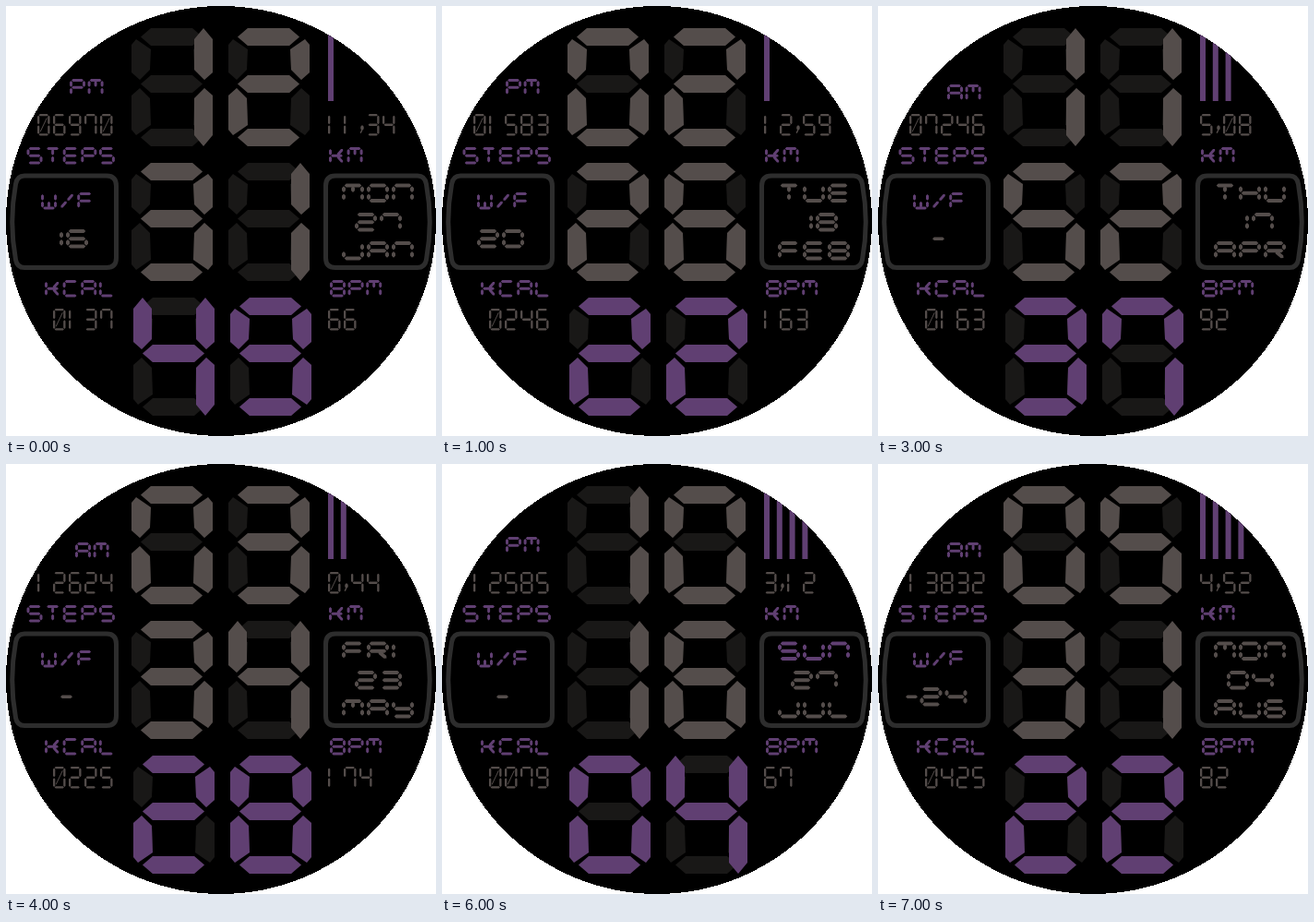
Animation, 466 px wide and 466 px high, one loop 8 s. Source, as an HTML page:

```html
<!DOCTYPE html>
<html lang="en">
<head>
<meta charset="utf-8">
<title>Digital watch face</title>
<style>
html, body { margin: 0; width: 100%; height: 100%; overflow: hidden; background: #fff; }
svg { display: block; width: 466px; height: 466px; }
</style>
</head>
<body>
<svg viewBox="0 0 466 466" role="img" aria-label="Watch face">
  <clipPath id="dial"><circle cx="233" cy="233" r="233"/></clipPath>
  <circle cx="233" cy="233" r="233" shape-rendering="crispEdges"/>
  <g clip-path="url(#dial)">
    <g fill="none" stroke="#2d2d2d" stroke-width="5">
      <path id="box" d="M20 184H109Q119.5 184 119.5 195V273Q119.5 283.500 109 283.500H20Q12 283.500 10.500 275Q3 234 10.500 193Q12 184 20 184Z"/>
      <use href="#box" transform="translate(466 0) scale(-1 1)"/>
    </g>
    <path id="dim" fill="#191817"/>
    <path id="grey" fill="#544d4b"/>
    <path id="purple" fill="#603f72"/>
  </g>
</svg>
<script>
// Lit segments: a-g as on a seven-segment display,
// i/l upper and lower centre, j/k/m diagonals, z a thin slash.
const GLYPHS = {
  0: 'abcdef', 1: 'bc', 2: 'abged', 3: 'abgcd', 4: 'fbgc', 5: 'afgcd',
  6: 'afgecd', 7: 'fabc', 8: 'abcdefg', 9: 'abcdfg',
  A: 'abcefg', B: 'abcdefg', C: 'adef', D: 'abcdef', E: 'adefg', F: 'aefg',
  G: 'acdefg', H: 'bcefg', I: 'ef', J: 'bcde', K: 'efgjk', L: 'def', M: 'abcefi',
  N: 'abcef', O: 'abcdef', P: 'abefg', R: 'abefgk', S: 'acdfg', T: 'ail',
  U: 'bcdef', W: 'bcdefl', Y: 'bcdfg', '/': 'jm'
};
const THIN = { ...GLYPHS, 0: 'abcdefz', 1: 'ef' };

const WIDE = { w: 24, h: 20.5, t: 4, gap: .7, step: 27, map: GLYPHS };
const LABEL = { w: 17, h: 18.5, t: 3, gap: .6, step: 19.6, map: GLYPHS };
const SLIM = { w: 13.5, h: 23.5, t: 2.3, gap: .5, step: 17, map: THIN };

const poly = pts => 'M' + pts.map(p => p.map(v => v.toFixed(1)).join(' ')).join('L') + 'Z';

// Hexagonal bar between two points
function bar(x1, y1, x2, y2, t, gap = 0, tip = t / 2) {
  const len = Math.hypot(x2 - x1, y2 - y1);
  const u = (x2 - x1) / len, v = (y2 - y1) / len, r = t / 2;
  const at = (s, n) => [x1 + u * s - v * n, y1 + v * s + u * n];
  const s = gap, e = len - gap;
  return poly([at(s, 0), at(s + tip, r), at(e - tip, r), at(e, 0), at(e - tip, -r), at(s + tip, -r)]);
}

function glyph(segs, x, y, { w, h, t, gap }) {
  const L = x + t / 2, R = x + w - t / 2, C = x + w / 2;
  const T = y + t / 2, B = y + h - t / 2, M = y + h / 2;
  const ends = {
    a: [L, T, R, T], b: [R, T, R, M], c: [R, M, R, B], d: [L, B, R, B],
    e: [L, M, L, B], f: [L, T, L, M], g: [L, M, R, M],
    i: [C, T, C, M], l: [C, M, C, B],
    j: [C, M, R, T], k: [C, M, R, B], m: [C, M, L, B]
  };
  return [...segs].map(s => s === 'z'
    ? bar(L + 2, B - 3, R - 2, T + 3, 1)
    : bar(...ends[s], t, gap)).join('');
}

function text(str, x, y, font) {
  let d = '';
  for (const ch of str) {
    if (ch === ',') {
      d += bar(x + 3, y + 12, x + 3, y + 18, 3.4) + bar(x + 3, y + 17, x + 1, y + 21, 1.4);
      x += 8;
    } else if (ch === '-') {
      d += bar(x, y + font.h / 2, x + 13, y + font.h / 2, 3.6);
      x += 15.5;
    } else {
      d += glyph(font.map[ch], x, y, font);
      x += font.step;
    }
  }
  return d;
}

// Large digit, 88 x 128: one upright mirrored into four, three flat bars.
// An upright reaches to a point where the bar at its end is off.
function bigDigit(lit, x, y) {
  const flat = cy => bar(x + 10, y + cy, x + 77, y + cy, 19, 0, 11);
  const upright = (right, low) => {
    const mid = low ? 63 : 56;
    const end = lit.includes(low ? 'd' : 'a')
      ? [[0, 18], [5, 12], [21, 23]]
      : [[0, 12], [10, 0], [20, 12]];
    return poly([...end, [20, mid - 11], [9, mid], [0, mid - 8]].map(([a, b]) =>
      [x + (right ? 88 - a : a), y + (low ? 128 - b : b)]));
  };
  const draw = {
    a: () => flat(9.5), g: () => flat(60.5), d: () => flat(118.5),
    f: () => upright(false, false), b: () => upright(true, false),
    e: () => upright(false, true), c: () => upright(true, true)
  };
  return [...lit].map(s => draw[s]()).join('');
}

// Six digits in three rows of two
const bigDigits = digits => [...digits].map((ch, n) => {
  const row = n >> 1, shift = row === 2 ? 2 : 0;
  return bigDigit(GLYPHS[ch], 136 + 105 * (n % 2) + shift, 24 + 146 * row);
});

const LABELS = text('STEPS', 22.5, 153, LABEL) + text('KM', 350, 153, LABEL) +
  text('W/F', 38, 202, LABEL) + text('KCAL', 42, 297, LABEL) + text('BPM', 351, 297, LABEL);

// One reading a month: time, half, steps, km, w/f, kcal, bpm, day, bars
const READINGS = `
  123149 PM 06970 11,34 16 0137 66 27 1
  022622 PM 01583 12,59 20 0246 163 18 1
  073414 AM 01899 0,93 - 0384 166 05 6
  115237 AM 07246 5,08 - 0163 92 17 3
  033428 AM 12624 0,44 - 0225 174 23 2
  045154 PM 08317 2,75 - 0318 85 14 5
  101604 PM 12585 3,12 - 0079 67 27 4
  053122 AM 13832 4,52 -24 0425 82 04 4`.trim().split('\n');

const MONTHS = ['JAN', 'FEB', 'MAR', 'APR', 'MAY', 'JUN', 'JUL', 'AUG'];
const DAYS = ['SUN', 'MON', 'TUE', 'WED', 'THU', 'FRI', 'SAT'];

function build(line, month) {
  const [time, half, steps, km, wf, kcal, bpm, day, bars] = line.trim().split(' ');
  const weekday = new Date(2025, month, +day).getDay();
  const big = bigDigits(time);
  const name = text(DAYS[weekday], 364, 192.5, WIDE);
  const wfX = wf === '-' ? 59 : wf[0] === '-' ? 30 : 38;

  let grey = big.slice(0, 4).join('') +
    text(steps, 34, 117, SLIM) + text(km, 349, 117, SLIM) +
    text(kcal, 51, 328, SLIM) + text(bpm, 349, 328, SLIM) +
    text(wf, wfX, 242, WIDE) + text(day, 378, 224, WIDE) +
    text(MONTHS[month], 364, 255, WIDE);
  let purple = big.slice(4).join('') + LABELS +
    (half === 'PM' ? text(half, 69, 79, LABEL) : text(half, 75, 85, LABEL));
  for (let n = 0; n < bars; n++) purple += `M${349 + n * 13.8} 20h6v83h-6Z`;

  if (weekday === 0) purple += name;
  else grey += name;
  return { grey, purple };
}

const scenes = READINGS.map(build);
const setPath = (id, d) => document.getElementById(id).setAttribute('d', d);
setPath('dim', bigDigits('888888').join(''));

let shown = -1;
function draw(ms) {
  const n = Math.floor(ms / 1000) % scenes.length;
  if (n === shown) return;
  shown = n;
  setPath('grey', scenes[n].grey);
  setPath('purple', scenes[n].purple);
}

const start = performance.now();
function tick() {
  draw(performance.now() - start);
  requestAnimationFrame(tick);
}
tick();
</script>
</body>
</html>
```
